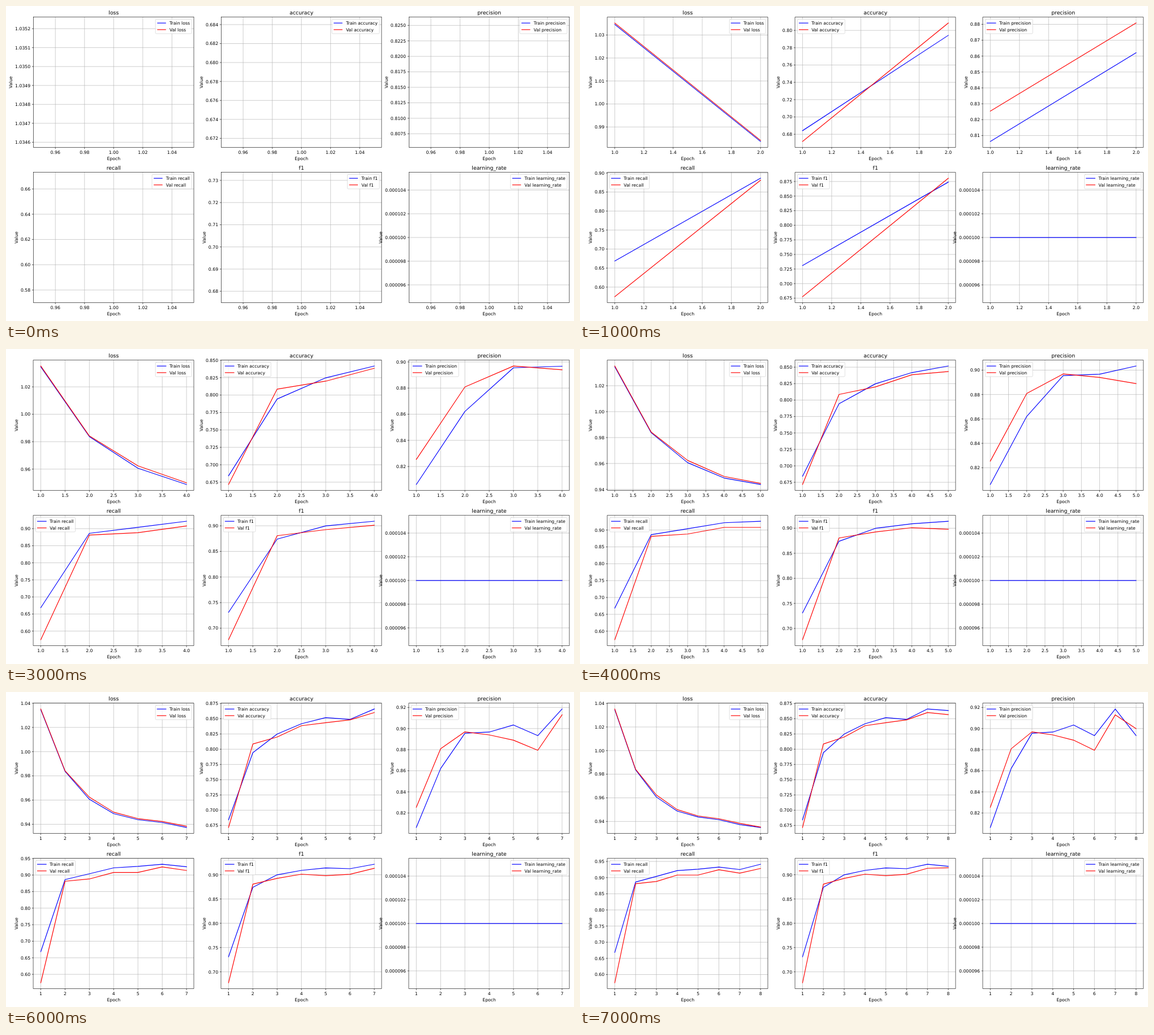
Recreate the animation shown at these times as an HTML page with a canvas. Size 1004 px wide and 558 px high, loop 8 s.

```html
<!DOCTYPE html>
<html lang="en">
<head>
<meta charset="utf-8">
<title>Training curves</title>
<style>
  html, body { margin: 0; width: 100%; height: 100%; overflow: hidden; background: #fff; }
  canvas { display: block; }
</style>
</head>
<body>
<canvas id="stage" width="1004" height="558"></canvas>
<script>
const ctx = document.getElementById('stage').getContext('2d');
const EPOCHS = 8, EPOCH_MS = 1000;
const W = 283.4, H = 230.9;
const EM = 7.75, PT = EM / 10;
const BLUE = '#00f', RED = '#f00';

const charts = [
  { name: 'loss', legend: 'right',
    train: [1.034604, .98369, .96064, .94878, .9438, .94147, .93737, .93489],
    val: [1.03523, .98418, .96238, .95002, .94469, .9423, .9384, .93522] },
  { name: 'accuracy',
    train: [.68417, .7943, .82474, .84175, .8518, .8488, .8659, .8634],
    val: [.67167, .80855, .82, .83843, .8434, .8481, .8601, .8567] },
  { name: 'precision',
    train: [.80625, .8621, .89555, .8967, .9034, .8933, .91856, .8934],
    val: [.82539, .88085, .8969, .894, .889, .8794, .91305, .8999] },
  { name: 'recall',
    train: [.66849, .88635, .9038, .9217, .9261, .9326, .925, .9414],
    val: [.57468, .8812, .8881, .9079, .9079, .9244, .9138, .9282] },
  { name: 'f1',
    train: [.73097, .874, .8998, .9089, .914, .9124, .9216, .9172],
    val: [.67753, .8806, .8925, .9011, .898, .9009, .9133, .9142] },
  { name: 'learning_rate', legend: 'right',
    train: Array(EPOCHS).fill(.0001), val: [] }
];

// Data limits with a 5% margin; a single value is widened first.
function limits(values) {
  let lo = Math.min(...values), hi = Math.max(...values);
  if (lo === hi) { lo *= .95; hi *= 1.05; }
  const pad = (hi - lo) * .05;
  return [lo - pad, hi + pad];
}

// Round tick values, at most nine intervals.
function ticks([lo, hi]) {
  const raw = (hi - lo) / 9;
  const exp = Math.floor(Math.log10(raw));
  const lead = [1, 2, 2.5, 5, 10].find(s => s * 10 ** exp >= raw);
  const step = lead * 10 ** exp;
  const digits = Math.max(0, -exp + (lead === 2.5) - (lead === 10));
  const list = [];
  for (let i = Math.ceil(lo / step); i * step <= hi; i++) {
    list.push({ v: i * step, label: (i * step).toFixed(digits) });
  }
  return list;
}

function path(points, color, width) {
  ctx.beginPath();
  points.forEach(([x, y]) => ctx.lineTo(x, y));
  ctx.strokeStyle = color;
  ctx.lineWidth = width;
  ctx.stroke();
}

function text(str, x, y, align = 'center', size = EM) {
  ctx.font = `${size}px "DejaVu Sans", sans-serif`;
  ctx.textAlign = align;
  ctx.fillStyle = '#000';
  ctx.fillText(str, x, y);
}

function drawLegend({ name }, left, top, side) {
  const rows = [['Train ' + name, BLUE], ['Val ' + name, RED]];
  ctx.font = `${EM}px "DejaVu Sans", sans-serif`;
  const w = Math.max(...rows.map(r => ctx.measureText(r[0]).width)) + 3.6 * EM;
  const x = side === 'right' ? left + W - EM / 2 - w : left + EM / 2;
  ctx.beginPath();
  ctx.roundRect(x, top + EM / 2, w, 25.5, EM / 5);
  ctx.fillStyle = 'rgba(255,255,255,.8)';
  ctx.fill();
  ctx.strokeStyle = 'rgba(204,204,204,.8)';
  ctx.lineWidth = PT;
  ctx.stroke();
  rows.forEach(([label, color], i) => {
    const y = top + 10.6 + i * 11.7, x0 = x + .4 * EM;
    path([[x0, y], [x0 + 2 * EM, y]], color, 1.5 * PT);
    text(label, x0 + 2.8 * EM, y + 2.8, 'left');
  });
}

function drawChart(chart, index, epoch) {
  const left = 48.6 + index % 3 * 331.9;
  const top = index < 3 ? 19.6 : 294.6;
  const right = left + W, bottom = top + H;
  const train = chart.train.slice(0, epoch), val = chart.val.slice(0, epoch);
  const xLim = epoch > 1 ? limits([1, epoch]) : limits([1]);
  const yLim = limits([...train, ...val]);
  const px = v => left + (v - xLim[0]) / (xLim[1] - xLim[0]) * W;
  const py = v => bottom - (v - yLim[0]) / (yLim[1] - yLim[0]) * H;
  const xTicks = ticks(xLim), yTicks = ticks(yLim);
  const thin = .8 * PT, tick = 3.5 * PT;

  ctx.fillStyle = '#fff';
  ctx.fillRect(left, top, W, H);
  ctx.lineCap = 'butt';
  for (const { v } of xTicks) path([[px(v), top], [px(v), bottom]], '#b0b0b0', thin);
  for (const { v } of yTicks) path([[left, py(v)], [right, py(v)]], '#b0b0b0', thin);

  for (const { v, label } of xTicks) {
    path([[px(v), bottom], [px(v), bottom + tick]], '#000', thin);
    text(label, px(v), bottom + 11.7);
  }
  let labelWidth = 0;
  for (const { v, label } of yTicks) {
    path([[left - tick, py(v)], [left, py(v)]], '#000', thin);
    text(label, left - 2 * tick, py(v) + 2.85, 'right');
    labelWidth = Math.max(labelWidth, ctx.measureText(label).width);
  }

  if (epoch > 1) {
    ctx.lineCap = 'square';
    ctx.lineJoin = 'round';
    const curve = (data, color) =>
      path(data.map((v, i) => [px(i + 1), py(v)]), color, 1.5 * PT);
    curve(train, BLUE);
    curve(val, RED);
  }

  ctx.strokeStyle = '#000';
  ctx.lineWidth = thin;
  ctx.strokeRect(left, top, W, H);

  text(chart.name, left + W / 2, top - 4.5, 'center', 1.2 * EM);
  text('Epoch', left + W / 2, bottom + 22.4);
  ctx.save();
  ctx.translate(left - 2 * tick - labelWidth - 4.75, top + H / 2);
  ctx.rotate(-Math.PI / 2);
  text('Value', 0, 0);
  ctx.restore();

  drawLegend(chart, left, top, epoch === 1 ? 'right' : chart.legend);
}

let shown = 0;
function frame(now) {
  const epoch = Math.floor(now / EPOCH_MS) % EPOCHS + 1;
  if (epoch !== shown) {
    shown = epoch;
    ctx.textRendering = 'geometricPrecision';
    ctx.fillStyle = '#fff';
    ctx.fillRect(0, 0, 1004, 558);
    charts.forEach((chart, i) => drawChart(chart, i, epoch));
  }
  requestAnimationFrame(frame);
}
frame(0);
</script>
</body>
</html>
```
